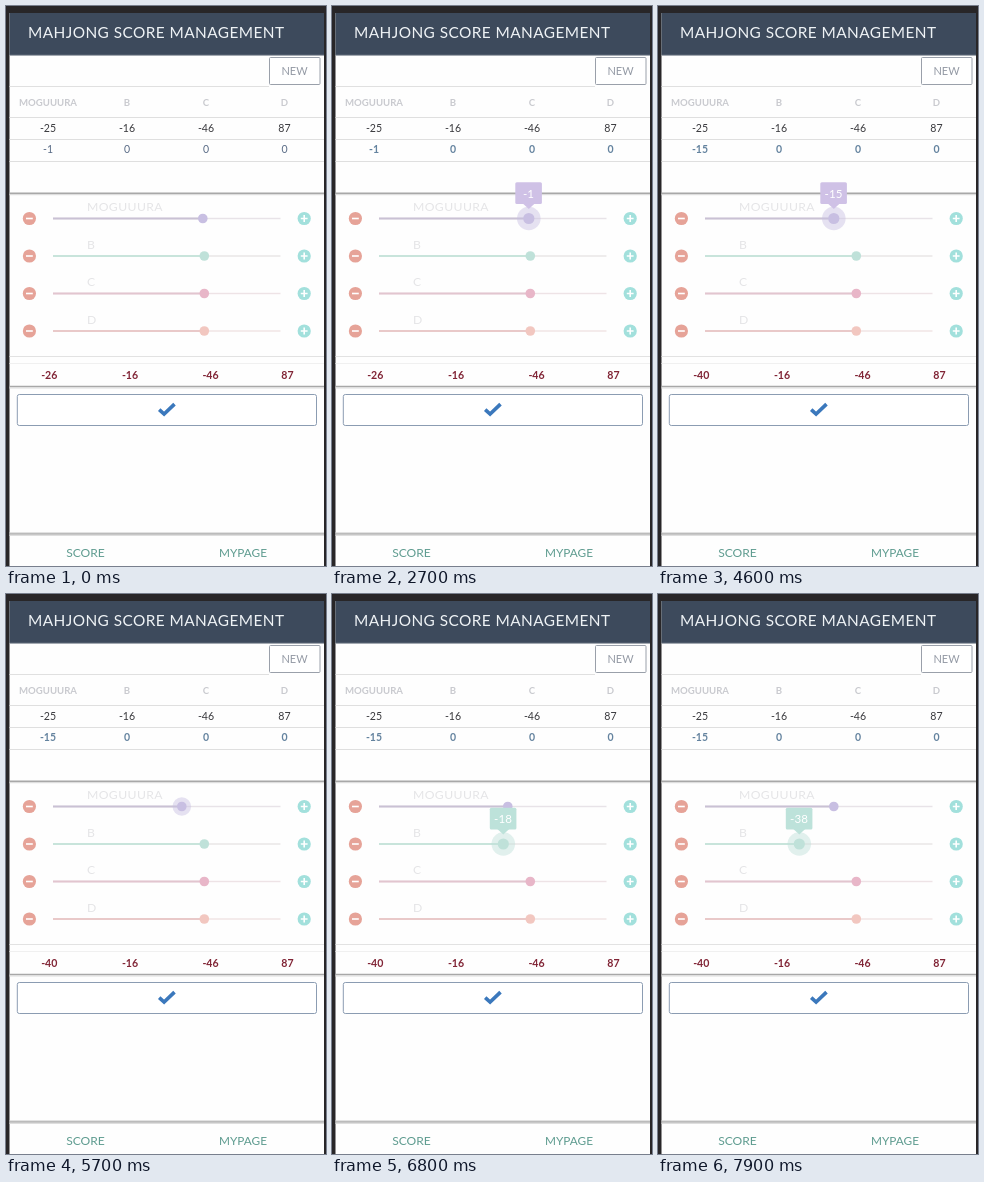
Recreate the animation shown at these times as an HTML page. Size 320 px wide and 560 px high, loop 8000 ms.

```html
<!DOCTYPE html>
<html lang="en">
<head>
<meta charset="utf-8">
<title>Mahjong score management</title>
<style>
  html, body { margin: 0; width: 100%; height: 100%; overflow: hidden; background: #282628; }
  svg { display: block; font-family: Lato, sans-serif; }
</style>
</head>
<body>
<svg id="stage" width="320" height="560" viewBox="0 0 320 560"></svg>
<script>
const LOOP = 8000, STEP = 100;
const players = ['MOGUUURA', 'B', 'C', 'D'];
const before = [-25, -16, -46, 87];
const sliders = [
  { y: 212.5, thumb: '#c8bfe2', track: '#c9c1d4', rail: '#e8e3e8', tip: '#cfc1e6' },
  { y: 250, thumb: '#bfe1d9', track: '#c8e4db', rail: '#e9e6e6', tip: '#bde2da' },
  { y: 287.5, thumb: '#e8b6c8', track: '#e2c5cf', rail: '#eee3e6', tip: '#e8b6c8' },
  { y: 325, thumb: '#f2c7c0', track: '#e9c9c9', rail: '#f0e5e4', tip: '#f2c7c0' }
];
// [time, value] points of each drag
const drags = [
  [[2600, -1], [2800, -2], [3300, -10], [3800, -15]],
  [[6400, 0], [6800, -18], [7600, -36], [7800, -38]]
];

const rect = (x, y, w, h, fill, more = '') =>
  `<rect x="${x}" y="${y}" width="${w}" height="${h}" fill="${fill}" ${more}/>`;
const line = (x1, x2, y, color, width = 1) =>
  `<path d="M${x1} ${y}H${x2}" stroke="${color}" stroke-width="${width}"/>`;
const circle = (x, y, r, fill, opacity = 1) =>
  `<circle cx="${x}" cy="${y}" r="${r}" fill="${fill}" opacity="${opacity}"/>`;
const text = (x, y, size, fill, s, weight = 400, anchor = 'middle', spacing = 0) =>
  `<text x="${x}" y="${y}" font-size="${size}" fill="${fill}" font-weight="${weight}" text-anchor="${anchor}" letter-spacing="${spacing}">${s}</text>`;
const row = (xs, y, size, fill, values, weight) =>
  values.map((v, i) => text(xs[i], y, size, fill, v, weight)).join('');
const edge = y => line(3.5, 318, y, '#a8a8a8', 1.4) + line(3.5, 318, y + 1.4, '#dedede', 1.4);

function valueAt(points, t) {
  if (t <= points[0][0]) return points[0][1];
  for (let i = 1; i < points.length; i++) {
    const [t0, a] = points[i - 1], [t1, b] = points[i];
    if (t <= t1) return Math.round(a + (b - a) * (t - t0) / (t1 - t0));
  }
  return points[points.length - 1][1];
}

function roundButton(x, y, color, plus) {
  return circle(x, y, 6.6, color) +
    `<path d="M${x - 3.4} ${y}h6.8${plus ? `M${x} ${y - 3.4}v6.8` : ''}" stroke="#fff" stroke-width="1.6"/>`;
}

function slider({ y, thumb, track, rail }, i, value, focus, tip) {
  const x = 198.3 + 1.5 * value;
  return text(81, y - 7.3, 12.2, '#e5e5e7', players[i], 400, 'start', .4) +
    roundButton(23.4, y, '#e6a398', false) + roundButton(298.2, y, '#a2e0dc', true) +
    line(47, 274.5, y, rail, 1.4) + line(47, x, y, track, 1.9) +
    (focus ? circle(x, y, tip ? 11.8 : 9.3, thumb, .45) : '') +
    circle(x, y, focus && tip ? 5.6 : 4.8, thumb);
}

function bubble({ y, tip }, value) {
  const x = 198.3 + 1.5 * value;
  return rect(x - 13.5, y - 36.2, 26.6, 21.6, tip, 'rx="1.5"') +
    `<path d="M${x - 6} ${y - 15}h12l-6 5.5z" fill="${tip}"/>` +
    text(x - .3, y - 21, 11.6, '#fff', value);
}

const columns = [42, 121, 200, 278.5];
const backdrop =
  rect(3.5, 7, 314.5, 553, '#fefefe') +
  rect(3.5, 7, 314.5, 42, '#3d4a5c') + line(3.5, 318, 49.3, '#8d949e') +
  text(22, 31.7, 15.4, '#eef2f5', 'MAHJONG SCORE MANAGEMENT', 400, 'start', .43) +
  line(3.5, 263, 80.5, '#e0e0e0') +
  rect(263.5, 51.5, 50.5, 27, '#fff', 'stroke="#9aa0aa" rx="1"') +
  text(288.5, 69, 11, '#949aa5', 'NEW') +
  row(columns, 100, 9.6, '#c9cacf', players, 700) +
  [111.5, 133.5, 155.5].map(y => line(3.5, 318, y, '#dfdfdf')).join('') +
  row(columns, 126, 10.6, '#3a3a3e', before) +
  edge(187.2) + line(3.5, 318, 350.5, '#e2e2e2') + line(3.5, 318, 357.5, '#f0f0f0') + edge(380.5) +
  rect(11.3, 388.5, 299.2, 31, '#fff', 'stroke="#8b9cb2" rx="2"') +
  '<path d="M153.2 403.6l4.9 4.5 10.4-10" fill="none" stroke="#3b78bc" stroke-width="3.6"/>' +
  line(3.5, 318, 526.8, '#d8d8d8') + edge(528) +
  text(79.5, 551, 12.1, '#5f9c90', 'SCORE') + text(237, 551, 11.8, '#5f9c90', 'MYPAGE');

function draw(t) {
  const values = [valueAt(drags[0], t), valueAt(drags[1], t), 0, 0];
  const scores = [t < 4200 ? -1 : -15, 0, 0, 0];
  const totals = before.map((v, i) => v + scores[i]);
  const focus = t >= 6400 ? 1 : t >= 2600 ? 0 : -1;
  const tip = (t >= 2600 && t < 5000) || t >= 6400;
  return backdrop +
    row(columns, 147.3, 10.5, t < 300 ? '#596b86' : '#64839f', scores, t < 300 ? 400 : 700) +
    sliders.map((s, i) => slider(s, i, values[i], i === focus, tip)).join('') +
    (tip ? bubble(sliders[focus], values[focus]) : '') +
    row([43.3, 124, 204.5, 281.5], 372.8, 10.6, '#812536', totals, 700);
}

const stage = document.getElementById('stage');
let shown = -1;
function frame() {
  const t = Math.floor(performance.now() % LOOP / STEP) * STEP;
  if (t !== shown) stage.innerHTML = draw(shown = t);
  requestAnimationFrame(frame);
}
frame();
</script>
</body>
</html>
```
